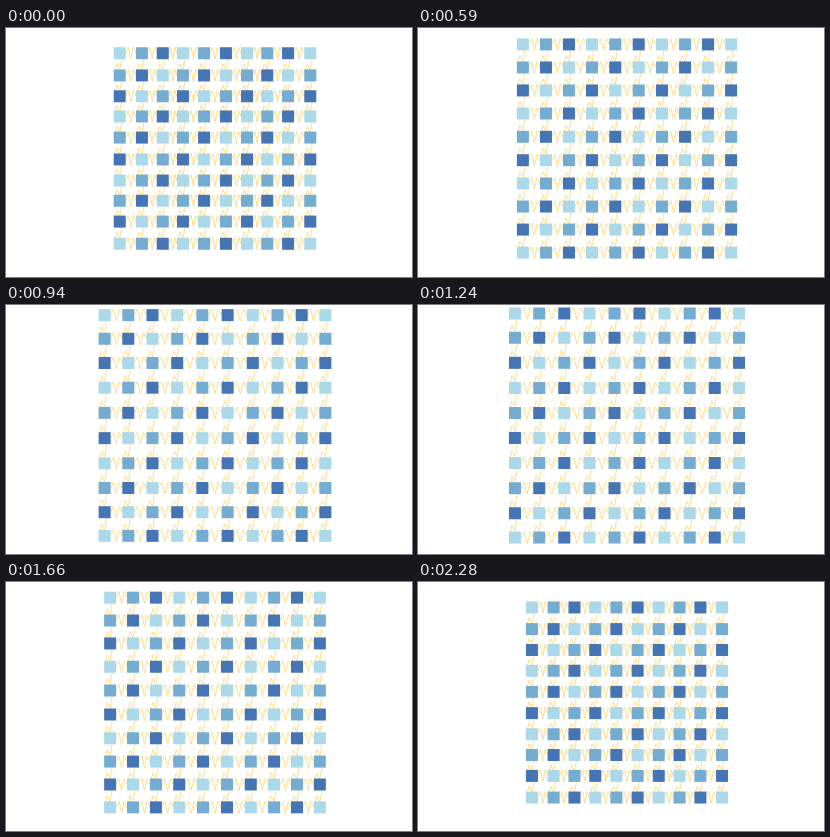
An HTML page with a canvas that plays this animation: 406 px wide and 249 px high, repeating every 2.33 s.

```html
<!DOCTYPE html>
<html lang="en">
<head>
<meta charset="utf-8">
<title>Spring lattice</title>
<style>
  html, body { margin: 0; width: 100%; height: 100%; overflow: hidden; background: #fff; }
  canvas { display: block; width: 100%; height: 100%; }
</style>
</head>
<body>
<canvas id="stage" width="406" height="249"></canvas>
<script>
const ctx = document.getElementById('stage').getContext('2d');
const LOOP = 2330, N = 10, GAP = 23.05, HALF = 6;
const CX = 209, CY = 120.5;
const BLUES = ['#abd9e9', '#74add1', '#4575b4'];

// Offset of each mass from the centre: rest spacing plus the odd normal modes of the chain.
function offsets(t) {
  const phase = 2 * Math.PI * (t + 14) / LOOP;
  const modes = [
    [1, -8.07 * Math.cos(phase)],
    [3, 0.865 * Math.cos(3 * phase)],
    [5, 0.4 * Math.exp(-t / 300)]
  ];
  return Array.from({ length: N }, (_, i) => {
    const j = i - (N - 1) / 2;
    return modes.reduce((d, [k, amp]) => d + amp * Math.sin(k * Math.PI * j / N), GAP * j);
  });
}

// Zigzag from the right side of one square to the left side of the next.
function spring(x1, y1, x2, y2) {
  const ax = x1 + HALF, dx = (x2 - HALF - ax) / 4, dy = (y2 - y1) / 4;
  [0, -1, 1, -1, 0].forEach((side, n) => {
    const x = ax + n * dx, y = y1 + n * dy + side * HALF;
    if (n) ctx.lineTo(x, y); else ctx.moveTo(x, y);
  });
}

function draw(t) {
  const d = offsets(t);
  const xs = d.map(v => CX + v), ys = d.map(v => CY + v);

  ctx.fillStyle = '#fff';
  ctx.fillRect(0, 0, 406, 249);

  ctx.strokeStyle = '#fee090';
  ctx.lineWidth = 1;
  ctx.beginPath();
  for (let r = 0; r < N; r++) {
    for (let c = 0; c < N; c++) {
      if (c < N - 1) spring(xs[c], ys[r], xs[c + 1], ys[r]);
      if (r < N - 1) spring(xs[c], ys[r], xs[c], ys[r + 1]);
    }
  }
  ctx.stroke();

  for (let r = 0; r < N; r++) {
    for (let c = 0; c < N; c++) {
      ctx.fillStyle = BLUES[(r + c) % 3];
      ctx.fillRect(xs[c] - HALF, ys[r] - HALF, 2 * HALF, 2 * HALF);
    }
  }
}

const start = performance.now();
function tick() {
  draw((performance.now() - start) % LOOP);
  requestAnimationFrame(tick);
}
tick();
</script>
</body>
</html>
```
